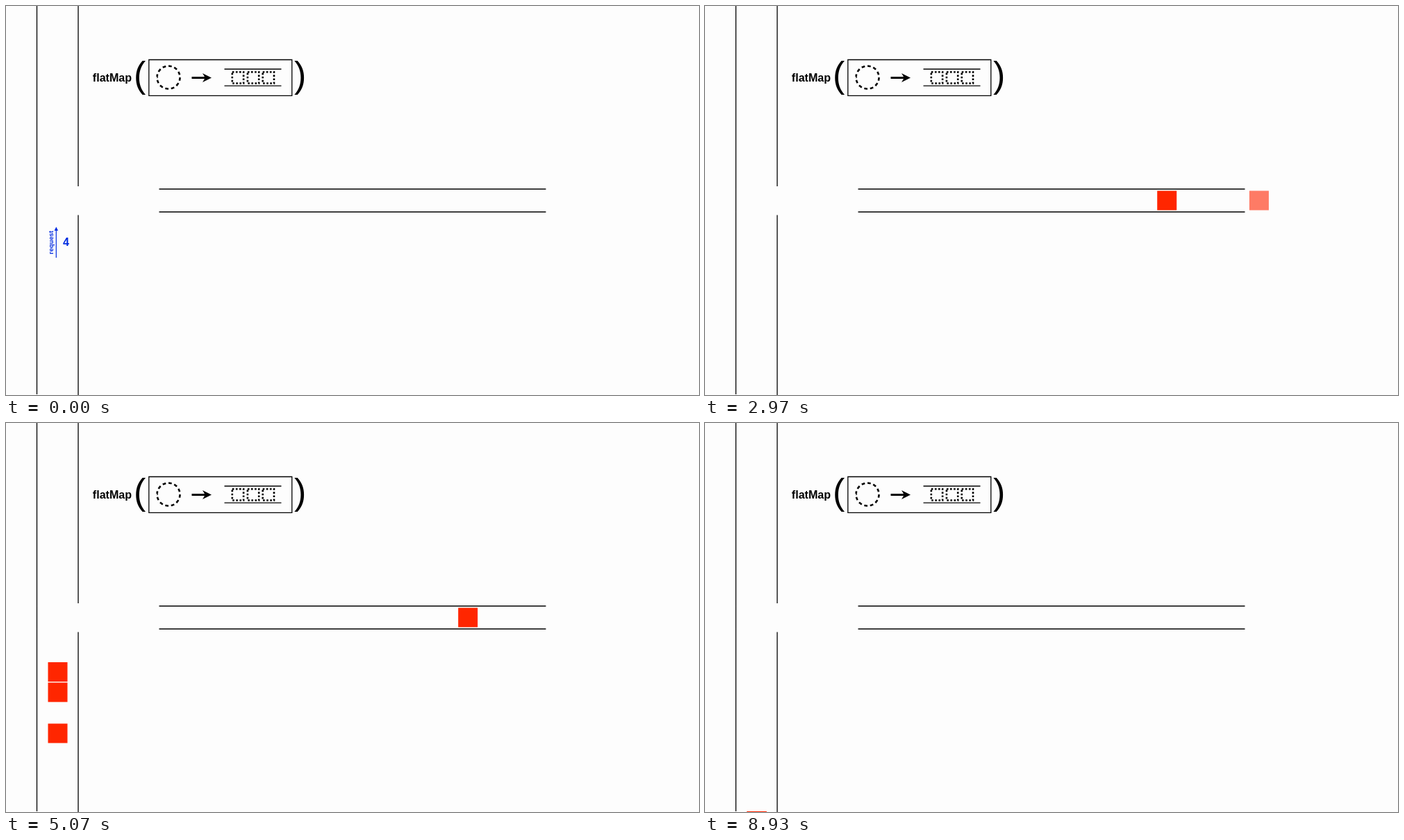
Write an HTML page that moves like this. It is 998 px wide and 561 px high and loops after 9.01 s.

```html
<!DOCTYPE html>
<html lang="en">
<head>
<meta charset="utf-8">
<title>flatMap request</title>
<style>
  html, body { margin: 0; width: 100%; height: 100%; overflow: hidden; background: #fdfdfd; }
  svg { display: block; width: 998px; height: 561px; }
  text { font-family: "Liberation Sans", Arial, sans-serif; }
  .bold { font-weight: bold; font-size: 16.1px; }
  .paren { font-size: 52px; }
  .line { fill: none; stroke: #000; stroke-width: 1.3; }
  .dash { fill: none; stroke: #000; stroke-width: 2.6; }
</style>
</head>
<body>
<svg viewBox="0 0 998 561">
  <path class="line" d="M44.5 0V560M104 0V260M104 301.5V561M220.5 264H777.5M220.5 297H777.5"/>
  <text class="bold" x="124.8" y="109">flatMap</text>
  <text class="paren" x="184" y="116.5">(</text>
  <text class="paren" x="415" y="116.5">)</text>
  <path class="line" d="M205.8 77.5H411.8V129.3H205.8ZM314.5 91H396.5M314.5 115.2H396.5"/>
  <circle class="dash" cx="234" cy="103" r="16.5" pathLength="24" stroke-dasharray="1.1 .9"/>
  <path d="M267.5 102H286L283 97L296 103.5L283 110L286 105H267.5Z"/>
  <path class="dash" stroke-dasharray="2.6 2.5"
    d="M325.8 95.2h16.3v16.3h-16.3zM347.9 95.2h16.3v16.3h-16.3zM369.7 95.2h16.3v16.3h-16.3z"/>
  <g id="request" fill="#002be0" text-anchor="middle">
    <text y="-8" font-size="9.4" font-weight="bold">request</text>
    <path d="M-22 -4.3H17V-6.4L22.5 -3.7L17 -1V-3.1H-22Z"/>
    <text class="bold" transform="translate(10.5 0) rotate(90)" id="count">4</text>
  </g>
  <g id="squares" fill="#ff2600"></g>
</svg>
<script>
const LOOP = 9010, TRAVEL = 1418;
const request = document.getElementById("request");
const squares = document.getElementById("squares");
document.getElementById("count").setAttribute("transform", "translate(0 10.5) rotate(90) translate(0 5.5)");

// Start of the run to the left, start and length of the drop
const items = [
  [2560, 4297, TRAVEL],
  [2839, 4489, TRAVEL],
  [3130, 4590, TRAVEL],
  [4660, 6100, 1120]
].map(([run, drop, fall]) => {
  const el = document.createElementNS("http://www.w3.org/2000/svg", "rect");
  el.setAttribute("width", 28);
  el.setAttribute("height", 28);
  squares.append(el);
  return { el, run, drop, fall };
});

const ramp = (t, start, length) => Math.min(1, Math.max(0, (t - start) / length));
const ease = (t, start, length) => {
  const u = ramp(t, start, length);
  return u * u * (3 - 2 * u);
};

function draw(t) {
  const rise = ease(t, 0, 720);
  const x = 76 + 736 * ease(t, 740, TRAVEL);
  const y = 341 - 59.5 * rise;
  request.setAttribute("transform", `translate(${x} ${y}) rotate(${90 * rise - 90})`);
  request.setAttribute("opacity", 1 - ramp(t, 1588, 570));

  for (const { el, run, drop, fall } of items) {
    el.setAttribute("x", 802 - 741.5 * ease(t, run, TRAVEL));
    el.setAttribute("y", 266.5 + 293.8 * ease(t, drop, fall));
    el.setAttribute("opacity", ramp(t, run, 220));
  }
}

const begin = performance.now();
function tick() {
  draw((performance.now() - begin) % LOOP);
  requestAnimationFrame(tick);
}
tick();
</script>
</body>
</html>
```
